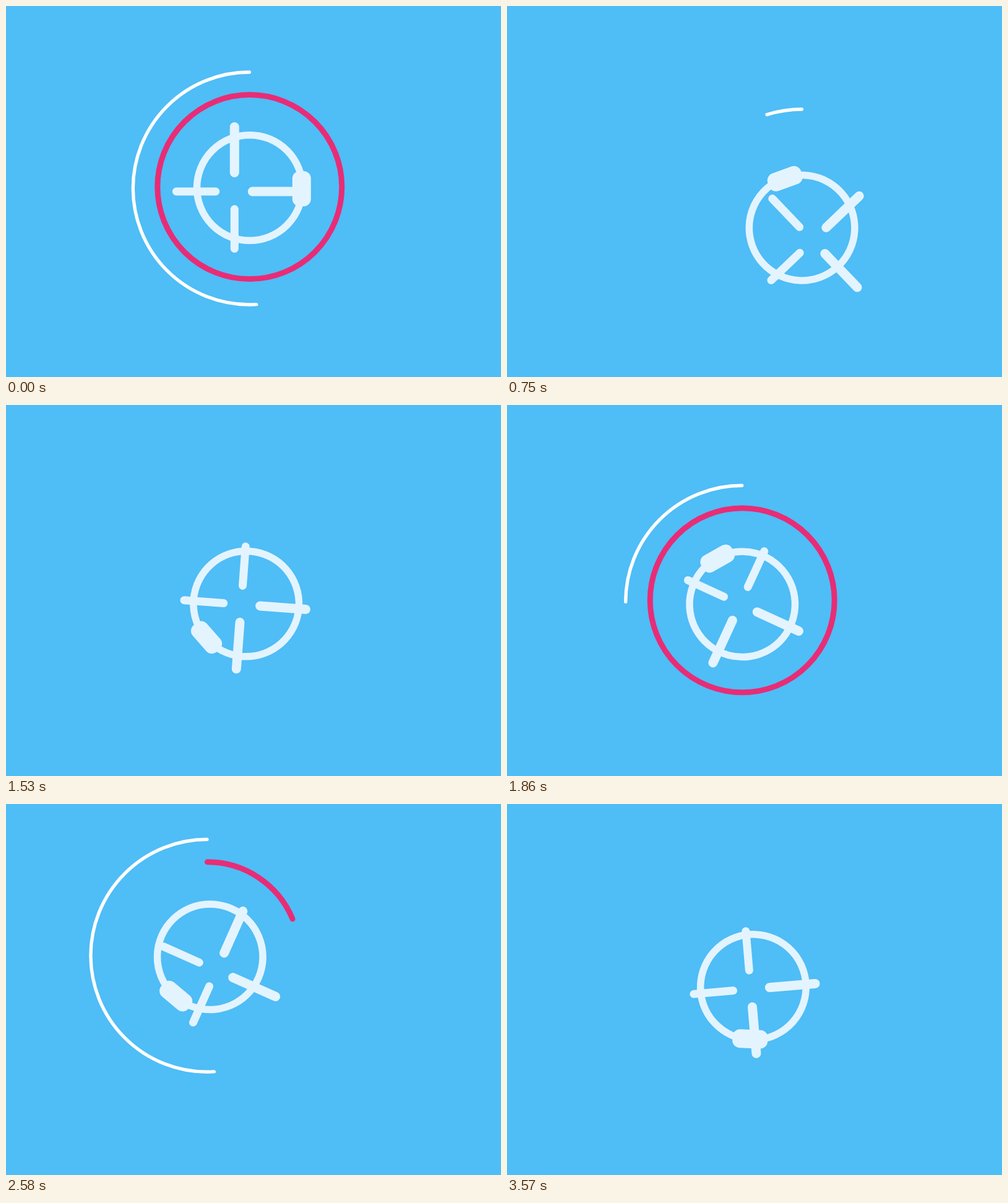
An HTML page with a canvas that plays this animation: 800x600 px, repeating every 3600 ms.

```html
<!DOCTYPE html>
<html lang="en">
<head>
<meta charset="utf-8">
<title>Scope</title>
<style>
  html, body { margin: 0; width: 100%; height: 100%; overflow: hidden; background: #4fbdf6; }
  canvas { display: block; }
</style>
</head>
<body>
<canvas id="stage" width="800" height="600"></canvas>
<script>
const ctx = document.getElementById('stage').getContext('2d');
const SKY = '#4fbdf6', PINK = '#e92c76', PALE = '#e3f4fe';
const STEP = 30, TOTAL = 120, CYCLE = 73;
const RAD = Math.PI / 180, TOP = -Math.PI / 2;

const linear = u => u;
const cubic = u => u < .5 ? 4 * u ** 3 : 1 - 4 * (1 - u) ** 3;
const smooth = u => u * u * (3 - 2 * u);
const settle = u => 1 - (1 - u) ** 1.3;

// Keys are [step, x, y, easing towards the next key].
const scopePath = [
  [0, 393.3, 295, cubic], [11, 476.5, 355, linear], [25.5, 476.5, 355, cubic],
  [34, 538.4, 256, cubic], [54, 381.3, 320, linear], [60.7, 381.3, 320, cubic],
  [68.5, 296, 224, settle], [88.5, 327, 246.8, linear],
  [108, 327, 246.8, cubic], [119, 393.4, 296, linear]
];
const crossPath = [
  [0, -24, 5, linear], [2, -24, 5.3, smooth], [16, 20.5, 26, linear],
  [25, 17.3, 24.5, linear], [27, 17.7, 22, smooth], [35, 12.5, 6, linear],
  [39, 9.2, 5.6, linear], [46, .6, 3.4, smooth], [54, -5, 3.5, smooth],
  [62, -3.2, 3.8, linear]
];

function along(path, step) {
  let i = 0;
  while (i < path.length - 1 && path[i + 1][0] <= step) i++;
  const [start, x, y, ease] = path[i];
  if (i === path.length - 1) return [x, y];
  const [end, nextX, nextY] = path[i + 1];
  const k = ease((step - start) / (end - start));
  return [x + (nextX - x) * k, y + (nextY - y) * k];
}

const ramp = (step, from, to) => Math.min(1, Math.max(0, (step - from) / (to - from)));

// Signed sweep in degrees, measured from the top.
function arc(x, y, radius, sweep, width, color) {
  if (!sweep) return;
  ctx.beginPath();
  ctx.arc(x, y, radius, TOP, TOP + sweep * RAD, sweep < 0);
  if (Math.abs(sweep) === 360) ctx.closePath();
  ctx.lineWidth = width;
  ctx.strokeStyle = color;
  ctx.stroke();
}

function bar(x1, y1, x2, y2, width) {
  ctx.beginPath();
  ctx.moveTo(x1, y1);
  ctx.lineTo(x2, y2);
  ctx.lineWidth = width;
  ctx.strokeStyle = PALE;
  ctx.stroke();
}

function drawDial(x, y, angle) {
  ctx.save();
  ctx.translate(x + 2, y + 1.5);
  ctx.rotate(angle * RAD);
  ctx.translate(-1.5, -2.5);
  arc(0, 0, 85.3, 360, 11.5, PALE);
  ctx.beginPath();
  ctx.roundRect(69, -27, 30, 57, 12);
  ctx.fillStyle = PALE;
  ctx.fill();
  ctx.restore();
}

function drawCross(x, y, angle) {
  ctx.save();
  ctx.translate(x, y);
  ctx.rotate(angle * RAD);
  bar(0, -104.5, 0, -30.5, 15);
  bar(29, 0, 104.5, 0, 15);
  bar(0, 28.5, 0, 92.5, 13);
  bar(-94, 0, -30.5, 0, 13);
  ctx.restore();
}

function draw(step) {
  const local = step % CYCLE;
  const [x, y] = along(scopePath, step);
  const [dx, dy] = along(crossPath, local);
  const white = local < 40
    ? 183.5 * (1 - ramp(local, 15, 26.05))
    : 270 * ramp(local, 57, 72);
  const pink = local < 40
    ? 360 * (1 - ramp(local, 0, 16))
    : 360 * ramp(local, 51, 62);
  const dialAngle = local < 36 ? local * 10 : 360 + (local - 36) * 9.25;

  ctx.fillStyle = SKY;
  ctx.fillRect(0, 0, 800, 600);
  ctx.lineCap = 'round';
  arc(x, y, 188, -white, 5.4, '#fff');
  arc(x + .5, y - 2.4, 149, pink, 9, PINK);
  drawDial(x, y, dialAngle);
  drawCross(x + dx, y + dy, local * 135 / CYCLE);
}

const began = performance.now();
function tick() {
  const elapsed = performance.now() - began;
  draw(Math.floor(elapsed / STEP) % TOTAL);
  requestAnimationFrame(tick);
}
tick();
</script>
</body>
</html>
```
